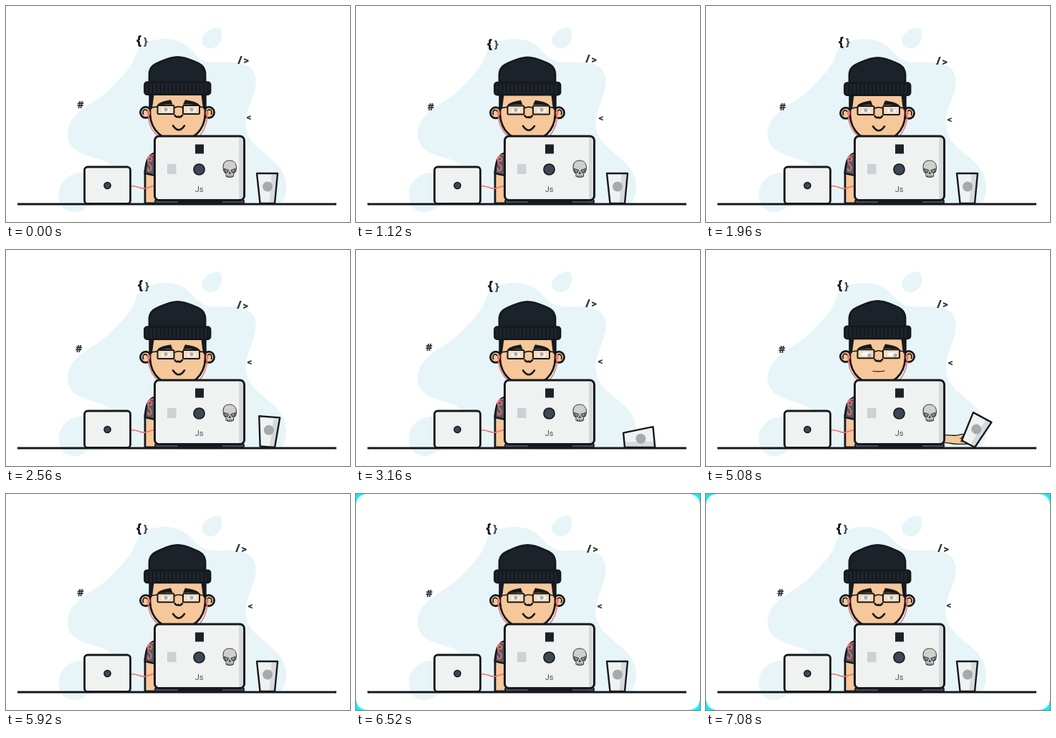
These frames come from a looping animation (480x302 px, 7.12 s). An HTML page:

```html
<!DOCTYPE html>
<html lang="en">
<head>
<meta charset="utf-8">
<title>Coder at a desk</title>
<style>
html, body { margin: 0; width: 100%; height: 100%; overflow: hidden; background: #fff; }
svg { display: block; width: 100%; height: 100%; }
.line { stroke: #15191e; stroke-width: 2.8; stroke-linejoin: round; stroke-linecap: round; }
.thin { stroke: #15191e; stroke-width: 1.7; stroke-linejoin: round; stroke-linecap: round; }
.skin { fill: #f6c799; }
.none { fill: none; }
.wire { fill: none; stroke: #f3736f; stroke-width: 1.6; stroke-linecap: round; }
.blob { fill: #e7f5f9; }
.case { fill: #f0f2f1; }
.shade { fill: #d6dadc; }
text { font-family: "Open Sans", "Noto Sans", sans-serif; font-weight: 800; fill: #35383c; text-anchor: middle; }
.angle { font-family: Roboto, "Open Sans", sans-serif; font-weight: 900; }
</style>
</head>
<body>
<svg viewBox="0 0 480 302">
  <g class="blob">
    <path d="M182 66C188 46 225 41 245 51C264 61 265 76 287 79C312 80 341 74 348 98C353 122 331 145 335 170C340 206 391 212 391 252C391 262 389 270 384 277H170C160 250 160 224 133 215C108 208 84 202 86 176C90 144 127 137 148 113C165 95 175 87 182 66Z"/>
    <path d="M75 273C69 252 84 233 106 233C120 233 126 250 126 277L113 281C104 291 80 292 75 273Z"/>
    <path d="M273 47C274 37 293 26 299 32C304 38 301 52 293 57C285 62 273 59 273 47Z"/>
  </g>

  <g id="braces">
    <text x="-4.6" y="5" font-size="17" style="fill:#111417">{</text>
    <text x="5" y="4.5" font-size="13.5" style="fill:#45484c">}</text>
  </g>
  <g id="hash"><text y="5" font-size="14">#</text></g>
  <g id="tag"><text x="-4.5" y="5" font-size="15.5">/</text><text class="angle" x="4" y="5.5" font-size="15">&gt;</text></g>
  <g id="less"><text class="angle" y="5" font-size="13.5">&lt;</text></g>

  <path class="line" d="M16 277H461" style="stroke-linecap:butt"/>

  <!-- arm and shirt -->
  <path class="line skin" d="M194 230L194 276H212V230Z"/>
  <path class="line" fill="#555b65" d="M214 205C201 205 195 212 194 234L208 237L216 230Z"/>
  <path class="wire" d="M207 208C196 209 195 216 202 217C206 213 201 209 198.500 213C195 222 205 222 202.500 228C201 232 197.500 231 198 227"/>

  <g id="head">
    <circle class="line skin" cx="195" cy="148.5" r="7.6"/>
    <circle class="line skin" cx="283" cy="148.5" r="7.6"/>
    <path class="thin none" d="M191.500 151C190 145 194 143 197 146M286.500 151C288 145 284 143 281 146"/>
    <path class="line skin" d="M201 118V151C202 174 219 188 240 188C261 188 277 174 278 151V118Z"/>
    <path fill="#15191e" d="M199.500 120H208C205 127 206 134 203.500 144H199.500ZM279.500 120H271C274 127 273 134 275.500 144H279.500Z"/>

    <ellipse cx="223" cy="145" rx="6" ry="3" fill="#f3f5f5"/>
    <ellipse cx="259" cy="145" rx="6" ry="3" fill="#f3f5f5"/>
    <g id="pupils" fill="#7d868c">
      <circle cx="223" cy="144.500" r="2.700"/>
      <circle cx="259" cy="144.500" r="2.700"/>
    </g>
    <g fill="#fff" fill-opacity=".35" style="stroke-width:2">
      <rect class="line" style="stroke-width:2" x="211.500" y="138.800" width="23" height="12" rx="1.500"/>
      <rect class="line" style="stroke-width:2" x="247" y="138.800" width="23" height="12" rx="1.500"/>
    </g>
    <path class="thin none" d="M211 140.500L203 141.500M270 140.500L277 141.500M235 142Q241 138.500 247 142"/>
    <path fill="#15191e" d="M211 138.800Q213 133.500 230 131L232.500 137.500Q220 136.500 211 138.800ZM270 138.800Q268 133.500 250 131L247 137.500Q260 136.500 270 138.800Z"/>
    <path class="line none" style="stroke-width:2.6" d="M235.500 152.500Q238 156 240.500 154.200Q243 156.500 246 152.500"/>
    <path id="mouth" class="line none"/>

    <path class="line" fill="#1c222a" d="M200 108V94C201 84 207 81 217 77C226 73 233 71 239.500 71C246 71 253 73 262 77C272 81 277 84 278 94V108Z"/>
    <rect class="line" x="193.500" y="106.300" width="91.500" height="17" rx="3.500" fill="#1e242b"/>
    <path d="M199 108V122" id="rib" stroke="#12161b" stroke-width="1.500"/>
    <g id="ribs"></g>
  </g>
  <path class="wire" d="M199 148.500V158C200 168 206 177 212 182M280.500 148.500V158C279 168 275 176 270 182"/>
  <path class="wire" style="stroke-width:4" d="M199 148.500V151M280.500 148.500V151"/>

  <!-- tablet -->
  <path class="wire" d="M174 252C183 250 185 256 194 255C200 254 203 251 208 252"/>
  <rect class="line case" x="109.500" y="225" width="64" height="51.500" rx="4.500"/>
  <circle class="thin" cx="141.500" cy="251" r="4.500" fill="#3d4854"/>

  <!-- reaching hand -->
  <g id="hand">
    <path class="skin thin" style="stroke-width:1.3" d="M295 263H340C348 263 352 264.500 358 263C363 261 367 262 366 264.500L362 266L370 267.500Q374 269.500 371 271.500L373 273Q374 275.800 369 275.800H356C350 275.800 346 274 341 274H295Z"/>
    <path class="thin none" style="stroke-width:1.1" d="M360 267.500L370 271M361 272H370"/>
  </g>

  <!-- cup -->
  <g id="cup">
    <path class="case" d="M350 234H379L375 276H355Z"/>
    <path class="shade" d="M370.500 234H379L375 276H367.500Z"/>
    <circle cx="365" cy="252.500" r="7" fill="#a5abac"/>
    <path class="line none" style="stroke-width:2.4" d="M350 234H379L375 276H354.500Z"/>
  </g>

  <!-- laptop -->
  <rect class="thin" x="208" y="271" width="124" height="5" rx="1.500" fill="#454c54"/>
  <path d="M240 274H302" stroke="#15191e" stroke-width="3"/>
  <rect class="case" x="207.500" y="182" width="125" height="89.500" rx="6"/>
  <path class="shade" d="M325 182H327Q332 182 332 188V266Q332 271 327 271H325Z"/>
  <rect class="line none" style="stroke-width:3" x="207.500" y="182" width="125" height="89.500" rx="6"/>
  <rect x="264" y="193.500" width="12" height="13" fill="#1d2126"/>
  <rect x="225" y="221" width="12.500" height="14" fill="#cbd1d5"/>
  <circle class="thin" cx="269.500" cy="228.500" r="7.500" fill="#3d4854"/>
  <text x="269.500" y="259.500" style="font:400 11px Roboto,sans-serif;fill:#4c5156">Js</text>
  <g stroke="#3f4346" stroke-width="1.1">
    <path fill="#cfd0ce" d="M303 225C303 219 307 216 312 216C318 216 321.500 220 321.500 226C321.500 230 320 233 317.500 234V238Q312 241 307 238V234C304 233 303 230 303 225Z"/>
    <path fill="#8f9394" d="M304.500 227.500L310.500 229.500L309 233L305.500 232ZM320 227.500L314 229.500L315.500 233L319 232ZM312.200 232L311.200 234.500H313.300Z"/>
    <path class="none" d="M309.500 236.500V239M312.200 236.500V239.500M315 236.500V239"/>
  </g>

  <path id="corners" fill="#00f4ff" fill-rule="evenodd" d="M0 0H480V302H0ZM17 0Q0 0 0 17V285Q0 302 17 302H463Q480 302 480 285V17Q480 0 463 0Z"/>
</svg>
<script>
const LOOP = 7120;
const $ = id => document.getElementById(id);
const place = (id, x, y) => $(id).setAttribute("transform", `translate(${x} ${y})`);
const lerp = (a, b, k) => a + (b - a) * k;
const ramp = (t, from, to) => Math.min(1, Math.max(0, (t - from) / (to - from)));
const ease = (t, from, to) => { const k = ramp(t, from, to); return k * k * (3 - 2 * k); };

for (let x = 5.5; x < 84; x += 5.5) {
  const rib = $("rib").cloneNode();
  rib.removeAttribute("id");
  rib.setAttribute("transform", `translate(${x} 0)`);
  $("ribs").append(rib);
}

// Drift of each floating symbol around its home position.
const times = [0, 560, 1120, 1960, 2600, 3160, 4360, 5200, 5920, 6600, LOOP];
const floats = [
  { id: "braces", x: 190, y: 49, dx: [0, 0, 1, 3, 2, 2, 2.5, 1, 0, -.5, 0], dy: [0, 2, 5, 2, 1, 2, 3, 1, 0, -.5, 0] },
  { id: "hash", x: 104, y: 138, dx: [0, 1, .5, 3, -2.5, -2, 0, 2, 0, -2, 0], dy: [0, 2, 3, 3, 0, -2, 2.5, 1, 0, 1, 0] },
  { id: "tag", x: 331, y: 76, dx: [0, -1, -3, -2, -1, -3, -2.5, -1, -3, -1, 0], dy: [0, -2, -2, 1, 1, -1, -2.5, 0, 0, 1, 0] },
  { id: "less", x: 339, y: 155, dx: [0, 2, 3, 1, 1, 2, 3, 2, 2, 1, 0], dy: [0, 0, 1, 3, 1, 0, 1, 2, 1, 1, 0] }
];

function spline(values, t) {
  const last = times.length - 1;
  const i = Math.min(last - 1, times.findIndex((v, n) => n === last || t < times[n + 1]));
  const slope = n => n === 0 || n === last ? 0
    : (values[n + 1] - values[n - 1]) / (times[n + 1] - times[n - 1]);
  const h = times[i + 1] - times[i], k = (t - times[i]) / h, k2 = k * k, k3 = k2 * k;
  return (2 * k3 - 3 * k2 + 1) * values[i] + (k3 - 2 * k2 + k) * h * slope(i)
    + (3 * k2 - 2 * k3) * values[i + 1] + (k3 - k2) * h * slope(i + 1);
}

function cupAngle(t) {
  const fall = ramp(t, 2480, 2840) ** 2;
  const bounce = Math.sin(Math.PI * ramp(t, 2840, 3040)) * 5;
  return 84.6 * (fall - ease(t, 4640, 5360)) - bounce;
}

function draw(t) {
  for (const f of floats) place(f.id, f.x + spline(f.dx, t), f.y + spline(f.dy, t));

  $("cup").setAttribute("transform", `rotate(${cupAngle(t)} 375 276)`);

  const lift = ease(t, 4640, 5360);
  const reach = ease(t, 3760, 4240) - ease(t, 5360, 5720);
  place("hand", lerp(-46, 0, reach) - 8 * lift * reach, -5 * Math.sin(Math.PI * lift));

  // The head sinks slightly while he works and rises as he looks over.
  place("head", 0, .3 + ease(t, 300, 1900) - .8 * ease(t, 3400, 4300));

  const worry = ease(t, 3400, 3720) - ease(t, 5400, 5720);
  place("pupils", 5 * worry, 2.5 * worry);
  $("mouth").setAttribute("d", `M233 ${lerp(167, 169, worry)}Q241 ${lerp(179, 170, worry)} 249 ${lerp(167, 168.5, worry)}`);
  $("mouth").style.strokeWidth = lerp(2.6, 1.2, worry);

  $("corners").style.display = t >= 6160 ? "" : "none";
}

function frame() {
  draw(performance.now() % LOOP);
  requestAnimationFrame(frame);
}
frame();
</script>
</body>
</html>
```
